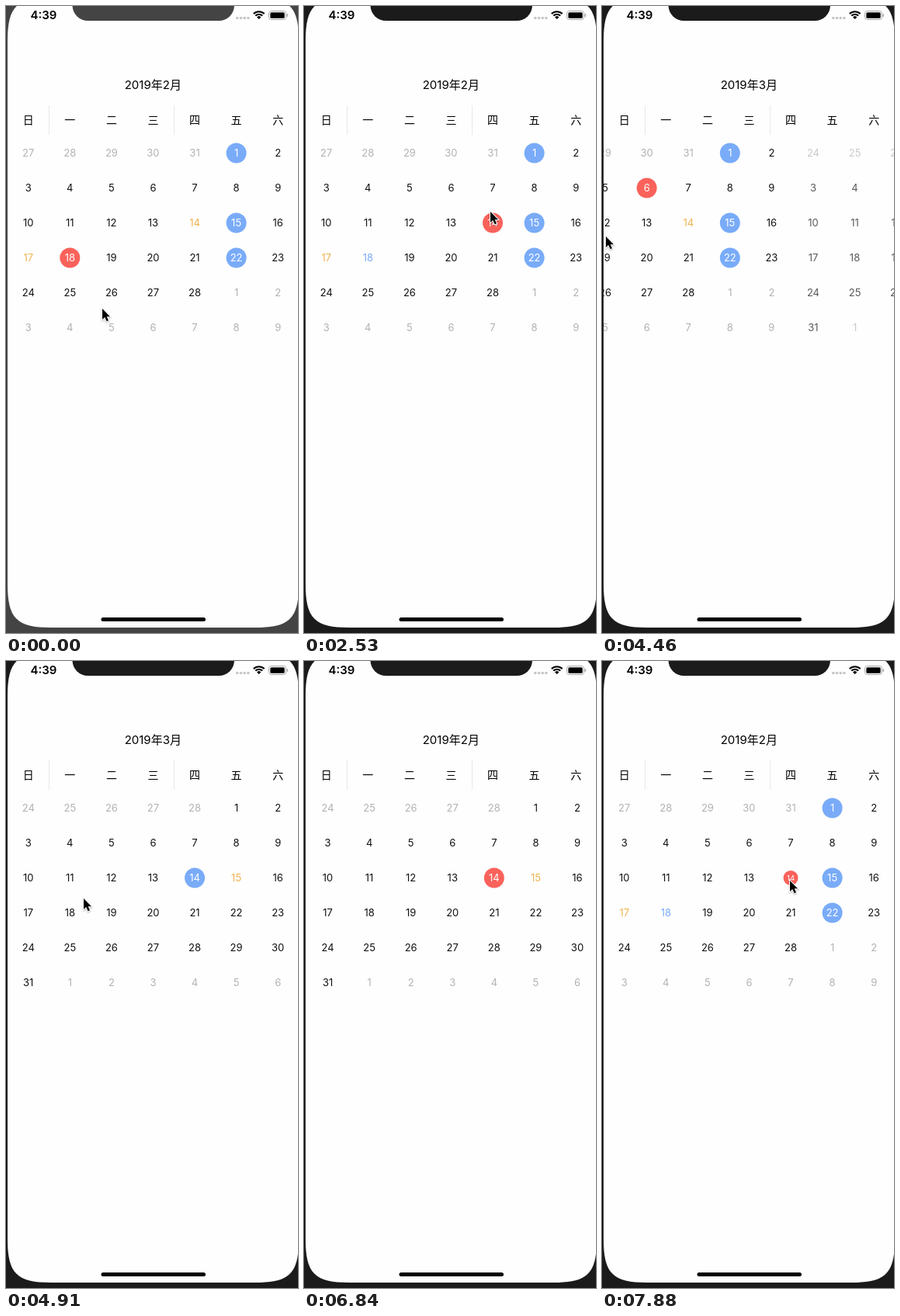
Write an HTML page with a canvas that moves like this. It is 376 by 808 pixels and loops after 8 s.

```html
<!DOCTYPE html>
<html lang="zh">
<head>
<meta charset="utf-8">
<style>
html, body { margin: 0; width: 100%; height: 100%; overflow: hidden; background: #1b1b1b; }
canvas { display: block; }
</style>
</head>
<body>
<canvas id="stage" width="376" height="808"></canvas>
<script>
const ctx = document.getElementById('stage').getContext('2d');
const FONT = "Inter, 'Noto Sans CJK SC', 'Noto Sans CJK', sans-serif";
const RED = '#f9625b', BLUE = '#79abf8', AMBER = '#efb34e', GRAY = '#b2b2b2', INK = '#111';
const LOOP = 8000, START = 450, STEP = 148.6;
const PAGE = 375, FEB = 1, MAR = 2;
const FOCUS = 1640, SWIPE_LEFT = 4395, SWIPE_RIGHT = 6839, GLIDE = 500;

// Key stops of the pointer tip: time, x, y
const stops = [
  [300, 124, 390], [1044, 181, 283], [1340, 253, 283], [2230, 245, 281],
  [2530, 240, 265], [2830, 244, 240], [3270, 195, 237], [3870, 192, 235],
  [4170, 255, 285], [4462, 5, 297], [4908, 100, 306], [5500, 285, 288],
  [5800, 277, 290], [6100, 246, 286], [6540, 130, 300], [6840, 390, 300],
  [7280, 279, 308], [7880, 242, 283]
];
const taps = [
  { at: -1000, month: FEB, day: 18 },
  { at: 1760, month: FEB, day: 14 },
  { at: 2722, month: FEB, day: 7 },
  { at: 3800, month: FEB, day: 6 },
  { at: 5693, month: MAR, day: 15 },
  { at: 6150, month: MAR, day: 14 },
  { at: 7826, month: FEB, day: 14 }
];
const filled = { [FEB]: [1, 15, 22], [MAR]: [14] };
const tinted = { [FEB]: { 14: AMBER, 17: AMBER, 18: BLUE }, [MAR]: { 15: AMBER } };

const clamp = v => Math.min(1, Math.max(0, v));
const mix = (a, b, p) => a + (b - a) * p;
const column = i => 28.75 + 53.57 * i;
const glide = (t, from) => 1 - (1 - clamp((t - from) / GLIDE)) ** 3;

function pointerAt(t) {
  const i = stops.findIndex(s => s[0] > t);
  const a = stops.at(i < 0 ? -1 : Math.max(0, i - 1)), b = stops.at(i);
  const p = clamp((t - a[0]) / (b[0] - a[0] || 1));
  return [mix(a[1], b[1], p), mix(a[2], b[2], p)];
}

// Bounce of a freshly picked day: 0.3 to 1.2, then back to 1
function bounce(age) {
  return age < 112.5 ? mix(0.3, 1.2, age / 112.5) : mix(1.2, 1, clamp((age - 112.5) / 37.5));
}

function text(str, x, y, size, color, weight = 400, align = 'center') {
  ctx.font = `${weight} ${size}px ${FONT}`;
  ctx.textAlign = align;
  ctx.fillStyle = color;
  ctx.fillText(str, x, y);
}

function disc(x, y, r, color) {
  ctx.fillStyle = color;
  ctx.beginPath();
  ctx.arc(x, y, r, 0, 7);
  ctx.fill();
}

function pill(x, y, w, h, r, color) {
  ctx.fillStyle = color;
  ctx.beginPath();
  ctx.roundRect(x, y, w, h, r);
  ctx.fill();
}

// Rectangle whose corners bend continuously
function screenPath(l, t, r, b) {
  const reach = 56, pull = 11.7, path = new Path2D();
  const bend = (x, y, dx, dy, horizontal) => {
    const side = d => [x, y + dy * d], flat = d => [x + dx * d, y];
    const [from, to] = horizontal ? [flat, side] : [side, flat];
    path.lineTo(...from(reach));
    path.bezierCurveTo(...from(pull), ...to(pull), ...to(reach));
  };
  bend(l, t, 1, 1, false);
  bend(r, t, -1, 1, true);
  bend(r, b, -1, -1, false);
  bend(l, b, 1, -1, true);
  path.closePath();
  return path;
}
const screen = screenPath(2, -11, 377, 801);

function drawMonth(month, left, alpha, pick, t) {
  if (Math.abs(left) >= PAGE) return;
  ctx.globalAlpha = alpha;
  for (let i = 0; i < 42; i++) {
    const date = new Date(2019, month, i - 4), day = date.getDate();
    const own = date.getMonth() === month;
    const picked = own && pick.month === month && pick.day === day;
    const round = picked || own && filled[month].includes(day);
    const color = round ? '#fff' : own ? tinted[month][day] || INK : GRAY;
    const size = picked ? bounce(t - pick.at) : 1;
    ctx.save();
    ctx.translate(left + column(i % 7), 189.5 + 45 * Math.floor(i / 7));
    ctx.scale(size, size);
    if (round) disc(0, 0, 13, picked ? RED : BLUE);
    text(day, 0, 4.7, 13, color);
    ctx.restore();
  }
  ctx.globalAlpha = 1;
}

function drawStatus() {
  text('4:39', 31.5, 17.3, 15, '#000', 600, 'left');
  for (let i = 0; i < 4; i++) disc(297.8 + 4.7 * i, 15.5, 1.8, '#c6c6c6');
  const fan = r => {
    ctx.beginPath();
    ctx.arc(325.7, 17, r, -Math.PI * 0.75, -Math.PI * 0.25);
  };
  ctx.strokeStyle = ctx.fillStyle = '#000';
  ctx.lineWidth = 2.1;
  for (const r of [9.8, 6.3]) {
    fan(r);
    ctx.stroke();
  }
  fan(3.7);
  ctx.lineTo(325.7, 17);
  ctx.fill();
  ctx.strokeStyle = '#a8a8a8';
  ctx.lineWidth = 1;
  ctx.beginPath();
  ctx.roundRect(338.5, 6.5, 22, 11, 3);
  ctx.stroke();
  pill(340.3, 8.3, 18.4, 7.4, 1.5, '#000');
  pill(361.6, 10, 1.5, 4, 1, '#a8a8a8');
}

function drawPointer(x, y) {
  const arrow = new Path2D('M0 0V14L3.2 11 5.6 16.3 8 15.3 5.7 10.2H10Z');
  ctx.save();
  ctx.translate(x, y);
  ctx.shadowColor = 'rgba(0,0,0,.3)';
  ctx.shadowBlur = 2;
  ctx.shadowOffsetY = 1;
  ctx.strokeStyle = '#fff';
  ctx.lineWidth = 2;
  ctx.stroke(arrow);
  ctx.shadowColor = 'transparent';
  ctx.fillStyle = '#000';
  ctx.fill(arrow);
  ctx.restore();
}

function draw(t) {
  const bezel = t < FOCUS ? '#444' : '#1b1b1b';
  const current = t >= SWIPE_LEFT && t < SWIPE_RIGHT ? MAR : FEB;
  const pick = taps.findLast(tap => tap.at <= t);
  const offset = PAGE * (glide(t, SWIPE_LEFT) - glide(t, SWIPE_RIGHT));

  ctx.fillStyle = bezel;
  ctx.fillRect(0, 0, 376, 808);
  ctx.save();
  ctx.clip(screen);
  ctx.fillStyle = '#fefefe';
  ctx.fillRect(0, 0, 376, 808);

  text(`2019年${current + 1}月`, 189.3, 107.4, 15, '#000');
  [...'日一二三四五六'].forEach((name, i) => text(name, column(i), 152, 14, '#000'));
  ctx.fillStyle = '#e8e8e8';
  for (const x of [55, 216]) ctx.fillRect(x, 128, 1, 38);

  for (const month of [FEB, MAR]) {
    const left = (month - FEB) * PAGE - offset;
    // The arriving month fades in over the first half of the swipe
    const alpha = month === current ? clamp(2 - 2 * Math.abs(left) / PAGE) : 1;
    drawMonth(month, left, alpha, pick, t);
  }
  drawStatus();
  pill(122.5, 788, 134.5, 5, 2.5, '#000');
  ctx.restore();

  pill(85.5, -40, 208.5, 59, 20, bezel);
  drawPointer(...pointerAt(t));
}

// The screen refreshes in even steps after an initial pause
function frame() {
  const t = performance.now() % LOOP;
  const step = Math.floor((t - START + 4) / STEP);
  draw(step < 0 ? 0 : START + step * STEP);
  requestAnimationFrame(frame);
}
frame();
</script>
</body>
</html>
```
